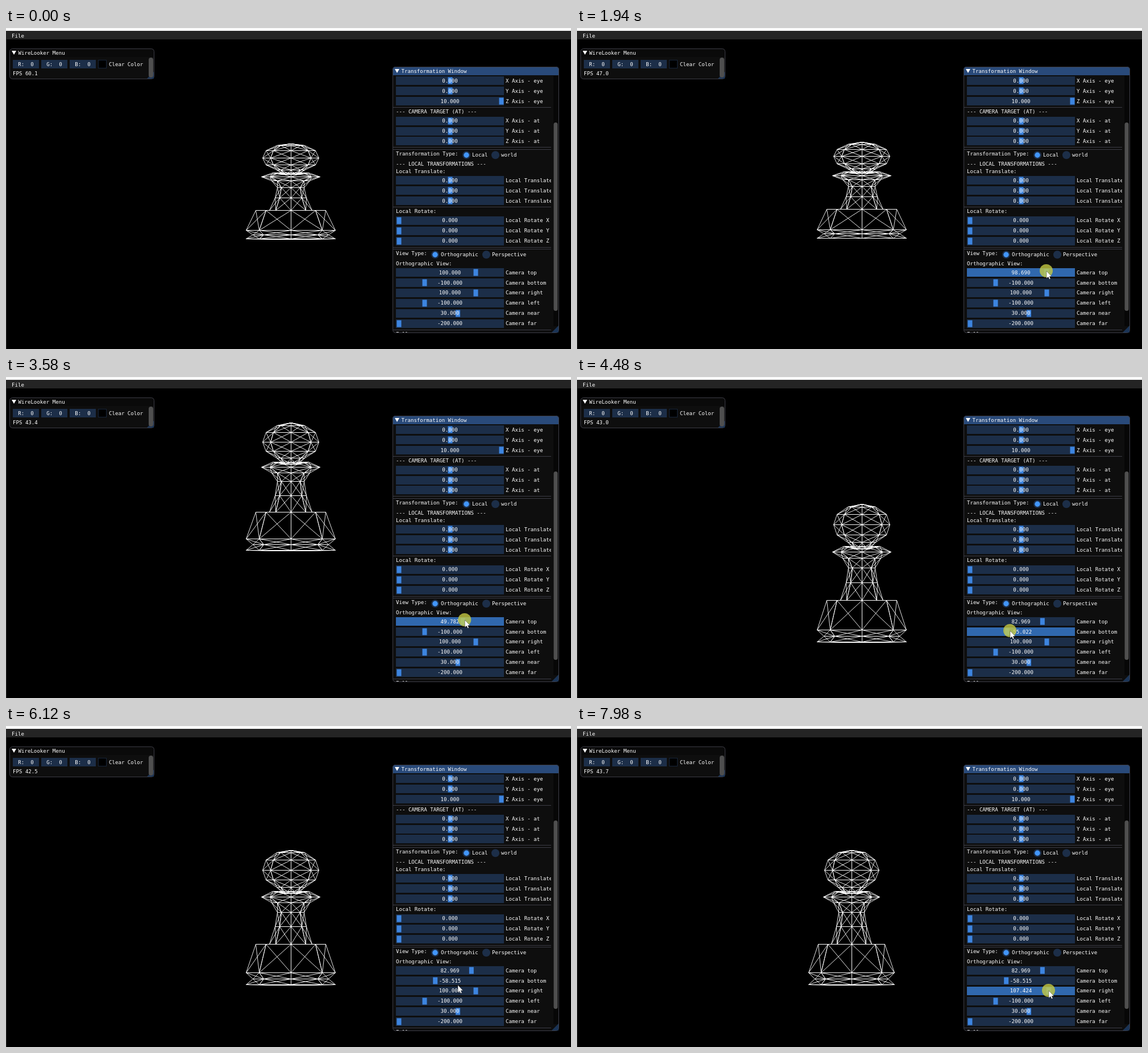
Animation, 994 px wide and 564 px high, one loop 8 s. Source, as an HTML page with a canvas:

```html
<!DOCTYPE html>
<html lang="en">
<head>
<meta charset="utf-8">
<title>Wireframe viewer</title>
<style>
  html, body { margin: 0; width: 100%; height: 100%; overflow: hidden; background: #000; }
  canvas { display: block; }
</style>
</head>
<body>
<canvas id="stage" width="994" height="564"></canvas>
<script>
const ctx = document.getElementById('stage').getContext('2d');
const LOOP = 8000;
const FRAME = '#1c2e48', HOVER = '#23446c', ACTIVE = '#3068ae';
const GRAB = '#3d85e0', GRAB_ACTIVE = '#4296fa', LINE = '#3c3c45', PANEL = 'rgba(15,15,15,.94)';
const UNIT = .7815; // stage pixels per interface pixel

// Turned pawn: a slightly flattened ball on a collar, neck and foot, as [height, radius]
const BALL = Array.from({ length: 6 }, (_, i) => {
  const angle = i * Math.PI / 6;
  return [20.4 + 8.8 * Math.cos(angle), 9.95 * Math.sin(angle)];
});
const PROFILE = [
  ...BALL, [10, 2.4], [11, 6.2], [8.6, 10.3], [6, 6.6], [1.9, 4.6], [-4.5, 5.5],
  [-12.2, 7.4], [-12.2, 12.2], [-24.8, 15.7], [-27.4, 13.3], [-30, 15.7], [-30.2, 2.3]
];
const SIDES = 8;

// Turning points of the pointer: time, x
const TURNS = [
  [70, 889], [800, 826], [1960, 826], [2705, 778], [3060, 819], [3320, 790], [3780, 818.8],
  [4200, 736.5], [4780, 790], [5744, 755.2], [6120, 795], [6450, 826.5], [6690, 826.5],
  [7480, 784], [7960, 830]
];
const DRAGS = { top: [1700, 3820], bottom: [4200, 5784], right: [6690, LOOP] };
const FPS = [60.1, 53.2, 47, 42.5, 43.4, 43, 41.1, 42.5, 43.2, 43.7];
const FPS_INTERVAL = 830;

function ease(t, from, to) {
  const f = Math.min(1, Math.max(0, (t - from) / (to - from)));
  return f * f * (3 - 2 * f);
}

function pointerAt(t) {
  let x = TURNS[0][1];
  for (let i = 1; i < TURNS.length; i++) {
    const [[from, a], [to, b]] = [TURNS[i - 1], TURNS[i]];
    x += (b - a) * ease(t, from, to);
  }
  const y = 494 - 67 * ease(t, 70, 800) + 19 * ease(t, 3780, 4200) + 19 * ease(t, 5800, 6450);
  return { x, y };
}

// Sliders run from -200 to 200 in 229 mouse steps and trail the pointer slightly
function dragged(name, start, t) {
  const [from, to] = DRAGS[name];
  if (t < from) return start;
  const step = Math.round((pointerAt(Math.min(t, to) - 40).x - 691.5) * 229 / 180);
  return step * 400 / 229 - 200;
}

function box(x, y, w, h, color, radius = 0) {
  ctx.fillStyle = color;
  ctx.beginPath();
  ctx.roundRect(x, y, w, h, radius);
  ctx.fill();
}

function text(s, x, y, align = 'left') {
  ctx.fillStyle = '#fff';
  ctx.textAlign = align;
  ctx.fillText(s, x, Math.round(y + 3));
}

function disc(x, y, r, color) {
  ctx.fillStyle = color;
  ctx.beginPath();
  ctx.arc(x, y, r, 0, 7);
  ctx.fill();
}

function polygon(points, color) {
  ctx.fillStyle = color;
  ctx.beginPath();
  points.forEach(([x, y]) => ctx.lineTo(x, y));
  ctx.closePath();
  ctx.fill();
}

function drawMesh({ top, bottom, right, left }) {
  const snap = v => Math.floor(v) + .5;
  const project = (ring, side) => {
    const [y, r] = PROFILE[ring];
    const x = r * Math.sin(side * 2 * Math.PI / SIDES);
    return [
      snap(.5 + 1001 * (x - left) / (right - left)),
      snap(3.3 + 565 * (top - y) / (top - bottom))
    ];
  };
  const edge = (a, b) => { ctx.moveTo(...a); ctx.lineTo(...b); };
  ctx.strokeStyle = '#fff';
  ctx.lineWidth = .9;
  ctx.beginPath();
  for (let ring = 0; ring < PROFILE.length; ring++) {
    for (let side = 0; side < SIDES; side++) {
      const p = project(ring, side);
      edge(p, project(ring, side + 1));
      if (ring + 1 < PROFILE.length) {
        edge(p, project(ring + 1, side));
        edge(p, project(ring + 1, side + 1));
      }
    }
  }
  ctx.stroke();
}

function drawWindow(x, y, w, h, title, titleColor) {
  box(x, y, w, h, PANEL, 5);
  box(x, y, w, 15, titleColor, [5, 5, 0, 0]);
  ctx.strokeStyle = LINE;
  ctx.lineWidth = 1;
  ctx.beginPath();
  ctx.roundRect(x + .5, y + .5, w - 1, h - 1, 5);
  ctx.stroke();
  polygon([[x + 4, y + 4], [x + 12, y + 4], [x + 8, y + 11]], '#fff');
  text(title, x + 15.5, y + 7.5);
  polygon([[x + w - 1, y + h - 13], [x + w - 1, y + h - 1], [x + w - 13, y + h - 1]], '#1b3456');
}

function drawMenuWindow(t) {
  drawWindow(6, 36, 255, 54, 'WireLooker Menu', '#0a0a0a');
  ['R', 'G', 'B'].forEach((channel, i) => {
    box(12 + 50 * i, 56, 46, 15, FRAME);
    text(channel + ':  0', 35 + 50 * i, 64, 'center');
  });
  box(162, 56, 15, 15, '#172438');
  box(163, 57, 13, 13, '#000');
  text('Clear Color', 181, 64);
  text('FPS ' + FPS[Math.floor(t / FPS_INTERVAL)].toFixed(1), 12, 80);
  box(251, 52, 8, 35, '#4f4f4f', 4);
}

function drawTransformWindow(view, mouse, activeName) {
  drawWindow(680, 68, 293, 468, 'Transformation Window', '#294a7a');
  box(963, 84, 8, 440, '#070707');
  box(963.5, 166, 7, 331, '#4f4f4f', 4);
  ctx.save();
  ctx.beginPath();
  ctx.rect(681, 83, 278, 452);
  ctx.clip();

  // Each widget is laid out at the running top and moves it down
  let top = 85.2;
  const advance = height => { top += height * UNIT; };

  function slider(label, value, min, max, active = false) {
    const y = Math.round(top);
    const hover = !activeName && mouse && Math.abs(mouse.x - 781) < 95 && mouse.y > y && mouse.y < y + 15;
    box(686, y, 190, 15, active ? ACTIVE : hover ? HOVER : FRAME);
    const x = 691.5 + 180 * (value - min) / (max - min);
    box(x - 4, y + 1.5, 8, 12, active ? GRAB_ACTIVE : GRAB);
    text(value.toFixed(3), 781, top + 7.5, 'center');
    text(label, 879, top + 7.5);
    advance(23);
  }
  function axes(label, min, max, z = 0) {
    for (const axis of 'XYZ') slider(label.replace('*', axis), axis === 'Z' ? z : 0, min, max);
  }
  function rule() {
    box(681, Math.round(top), 278, 1, LINE);
    advance(4);
  }
  function heading(s) {
    text(s, 686, top + 5);
    advance(17);
  }
  function choice(label, ...options) {
    text(label, 686, top + 5);
    options.forEach(([name, x], i) => {
      disc(x, top + 7.5, 7, FRAME);
      if (i === 0) disc(x, top + 7.5, 4.7, GRAB_ACTIVE);
      text(name, x + 10, top + 7.5);
    });
    advance(23);
  }

  axes('* Axis - eye', -10, 10, 10);
  rule();
  heading('--- CAMERA TARGET (AT) ---');
  axes('* Axis - at', -10, 10);
  rule();
  rule();
  choice('Transformation Type:', ['Local', 810], ['world', 861]);
  heading('--- LOCAL TRANSFORMATIONS ---');
  heading('Local Translate:');
  axes('Local Translate *', -10, 10);
  rule();
  heading('Local Rotate:');
  axes('Local Rotate *', 0, 360);
  rule();
  rule();
  choice('View Type:', ['Orthographic', 755], ['Perspective', 845]);
  heading('Orthographic View:');
  for (const [name, value] of Object.entries(view)) {
    slider('Camera ' + name, value, -200, 200, name === activeName);
  }
  rule();
  heading('Full');
  ctx.restore();
}

function drawPointer({ x, y }, pressed) {
  if (pressed) disc(x - .5, y - .5, 11.5, 'rgba(200,204,65,.78)');
  const arrow = [[0, 0], [0, 13], [3, 10.3], [5, 14.5], [7, 13.6], [5.2, 9.5], [9, 9.5]];
  polygon(arrow.map(([dx, dy]) => [x + dx, y + dy]), '#fff');
  ctx.strokeStyle = 'rgba(0,0,0,.6)';
  ctx.lineWidth = .6;
  ctx.stroke();
}

function draw(t) {
  const view = {
    top: dragged('top', 100, t), bottom: dragged('bottom', -100, t),
    right: dragged('right', 100, t), left: -100, near: 30, far: -200
  };
  const mouse = t >= 70 ? pointerAt(t) : null;
  const activeName = Object.keys(DRAGS).find(name => t >= DRAGS[name][0] && t < DRAGS[name][1]);

  box(0, 0, 994, 564, '#000');
  ctx.font = '9.1px "DejaVu Sans Mono", monospace';
  drawMesh(view);
  box(0, 0, 994, 5, '#fafafa');
  box(0, 5, 994, 15, '#242424');
  box(0, 5, 1, 559, '#2a2a2a');
  text('File', 10, 13.5);
  drawMenuWindow(t);
  drawTransformWindow(view, mouse, activeName);
  if (mouse) drawPointer(mouse, activeName);
}

const start = performance.now();
function tick() {
  draw((performance.now() - start) % LOOP);
  requestAnimationFrame(tick);
}
tick();
</script>
</body>
</html>
```
